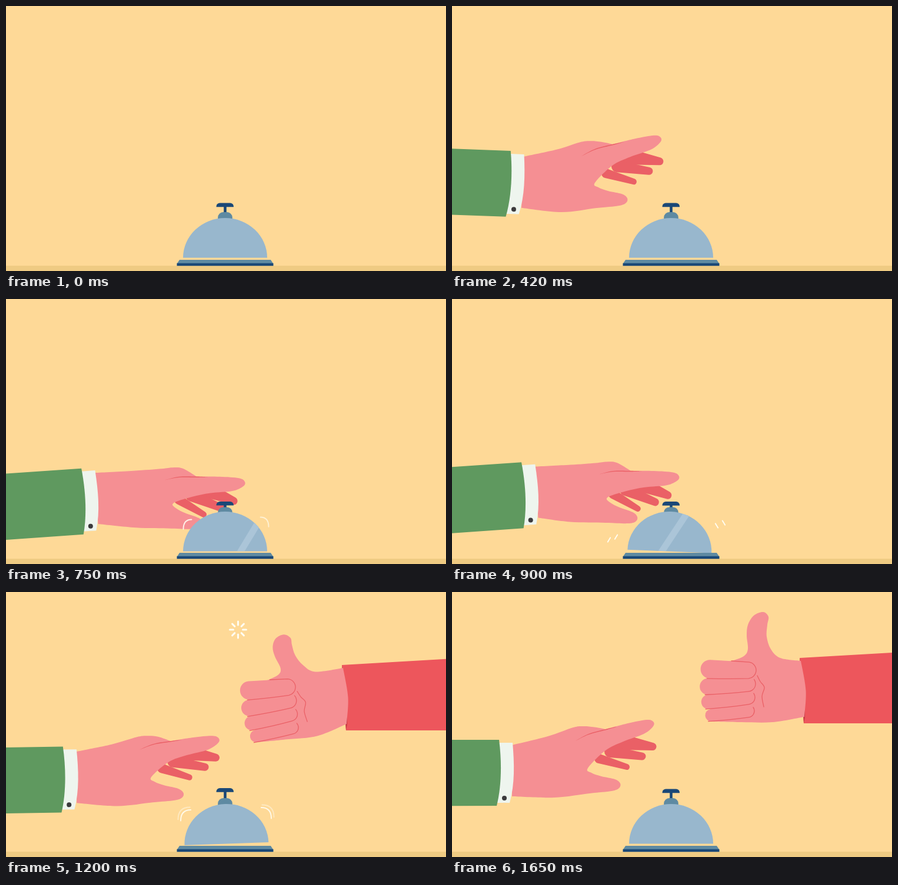
An HTML page with a canvas that plays this animation: 748 px wide and 450 px high, repeating every 2130 ms.

```html
<!DOCTYPE html>
<html lang="en">
<head>
<meta charset="utf-8">
<title>Service bell</title>
<style>
html, body { margin: 0; width: 100%; height: 100%; overflow: hidden; background: #fed997; }
canvas { display: block; }
</style>
</head>
<body>
<canvas id="stage" width="748" height="450"></canvas>
<script>
const ctx = document.getElementById('stage').getContext('2d');
const LOOP = 2130, STEP = 30, REST = 1650;
const C = {
  wall: '#fed997', floor: '#efcb83', skin: '#f58f93', shade: '#ea6066',
  green: '#5f995f', cuff: '#eef5ee', button: '#3b3a3c', red: '#ed565c', darkRed: '#c43a45',
  dome: '#98b7cd', shine: '#abc5d8', steel: '#5e8aa2', navy: '#1a4877', spark: '#fffdf2'
};

// ---- easing ----
const rad = degrees => degrees * Math.PI / 180;
const ramp = (t, from, to) => Math.min(1, Math.max(0, (t - from) / (to - from)));
const smooth = (t, from, to) => { const u = ramp(t, from, to); return u * u * (3 - 2 * u); };
const easeOut = (u, power) => 1 - (1 - u) ** power;
const backOut = (u, c) => 1 + (c + 1) * (u - 1) ** 3 + c * (u - 1) ** 2;

// ---- geometry and drawing helpers ----
function turn([x, y], degrees, px = 0, py = 0) {
  const c = Math.cos(rad(degrees)), s = Math.sin(rad(degrees));
  return [px + (x - px) * c - (y - py) * s, py + (x - px) * s + (y - py) * c];
}

function within(x, y, degrees, paint) {
  ctx.save();
  ctx.translate(x, y);
  ctx.rotate(rad(degrees));
  paint();
  ctx.restore();
}

// Point of one frame (x, y, degrees) from its local coordinates, and back.
const toWorld = (p, [x, y, degrees]) => { const q = turn(p, degrees); return [q[0] + x, q[1] + y]; };
const toLocal = (p, [x, y, degrees]) => turn([p[0] - x, p[1] - y], -degrees);

// Catmull-Rom curve; several chains meet in corners.
function spline(p, first) {
  if (first) ctx.moveTo(...p[0]); else ctx.lineTo(...p[0]);
  for (let i = 0; i < p.length - 1; i++) {
    const a = p[i - 1] || p[i], b = p[i], c = p[i + 1], d = p[i + 2] || c;
    ctx.bezierCurveTo(b[0] + (c[0] - a[0]) / 6, b[1] + (c[1] - a[1]) / 6,
      c[0] - (d[0] - b[0]) / 6, c[1] - (d[1] - b[1]) / 6, c[0], c[1]);
  }
}

function fillChains(color, ...chains) {
  ctx.beginPath();
  chains.forEach((chain, i) => spline(chain, i === 0));
  ctx.fillStyle = color;
  ctx.fill();
}

function poly(color, ...points) {
  ctx.beginPath();
  points.forEach(p => ctx.lineTo(...p));
  ctx.fillStyle = color;
  ctx.fill();
}

function box(color, x, y, w, h, radii = 0) {
  ctx.beginPath();
  ctx.roundRect(x, y, w, h, radii);
  ctx.fillStyle = color;
  ctx.fill();
}

// Finger: hull of a root circle and a tip circle.
function finger(color, x0, y0, r0, x1, y1, r1) {
  const dir = Math.atan2(y1 - y0, x1 - x0);
  const side = Math.acos((r0 - r1) / Math.hypot(x1 - x0, y1 - y0));
  ctx.beginPath();
  ctx.arc(x0, y0, r0, dir + side, dir - side);
  ctx.arc(x1, y1, r1, dir - side, dir + side);
  ctx.fillStyle = color;
  ctx.fill();
}

// ---- pressing hand, drawn around its knuckle ----
const indexShape = [[37, 5], [75, -5], [107, -11], [118, -8], [118, 0], [102, 13], [67, 26], [37, 41]];
const thumbShape = [[7, 71], [13, 79], [30, 85], [53, 90], [62, 97], [60, 105], [47, 110], [10, 114], [-50, 121]];
const crease = [[-16, 26], [8, 13], [37, 5], [55, 1]];

function pressingHand(t) {
  const lift = ramp(t, 900, REST), settle = easeOut(lift, 1.6);
  const press = smooth(t, 390, 690) * (1 - lift) ** 3;
  const sleeve = [
    130 - 392 * (1 - ramp(t, 60, 700)) ** 3.1 - 12 * smooth(t, 700, 900) - 38 * settle,
    246 + 44 * smooth(t, 440, 800) - 13 * smooth(t, 790, 910) - 26 * settle,
    2.4 * (1 - smooth(t, 390, 690)) - 3.9 * press
  ];
  const reach = 135 + 21 * smooth(t, 400, 630) - 12 * smooth(t, 700, 900);
  const knuckle = [...toWorld([reach, -23 + 32 * press], sleeve), 0];
  const drop = 15 * easeOut(press, 2), curl = press ** 1.5;
  const wrist = y => toLocal(toWorld([22, y], sleeve), knuckle);
  const lower = p => turn(p, drop, 0, 28);

  within(...knuckle, () => {
    within(0, 0, 0, () => {
      ctx.translate(20, -5);
      ctx.rotate(rad(14 * curl));
      ctx.translate(-20, 5);
      finger(C.shade, 60, 26, 14, 117, 34.5, 6.5);
      finger(C.shade, 45, 43, 10, 99, 51, 6.5);
      finger(C.shade, 26, 55, 8, 73, 69, 5);
    });
    const top = wrist(9);
    fillChains(C.skin,
      [top, [top[0] / 2, top[1] / 2 + 1], [-18, 2], [0, 0], [18, 1.5], lower(indexShape[0])],
      [...indexShape.map(lower), ...thumbShape.map(p => turn(p, 8 * curl, 80, 30)), wrist(96)]);
    const line = crease.map(lower);
    fillChains(C.shade, line, line.map(([x, y], i) => [x, y + 1.6 * Math.sin(i)]).reverse());
  });

  within(...sleeve, () => {
    ctx.fillStyle = C.cuff;
    ctx.beginPath();
    ctx.moveTo(-4, 5);
    ctx.lineTo(23, 5);
    ctx.bezierCurveTo(26, 40, 27, 75, 18, 107);
    ctx.lineTo(-6, 107);
    ctx.fill();
    box(C.button, 5, 95, 8, 8, 4);
    ctx.fillStyle = C.green;
    ctx.beginPath();
    ctx.moveTo(0, 0);
    ctx.bezierCurveTo(5, 40, 4, 80, -4, 112);
    ctx.lineTo(-500, 113);
    ctx.lineTo(-500, 0);
    ctx.fill();
  });
}

// ---- thumbs-up hand, drawn around the tip of its first folded finger ----
const raisedThumb = [[41, -21], [25, -36], [18, -57], [19, -77], [21, -91], [12, -99],
  [-4, -93], [-14, -77], [-16, -59], [-14, -36], [-21, -24], [-41, -16]];
const palmLine = [[2, 9], [7, 19], [14, 29], [10, 44], [13, 62]];

// Folding shears the thumb over the fist and squashes it.
function foldThumb([x, y], fold) {
  const h = -16 - y;
  return [x - 20 * fold * fold - 0.55 * h * fold, y + 0.72 * h * fold * fold];
}

function thumbsUp(t) {
  if (t <= 900) return;
  const swing = (1 - ramp(t, 900, 1200)) ** 2;
  const recover = backOut(ramp(t, 1200, REST), 2.5);
  const move = (low, entry, rest) => low + entry * swing + rest * recover;
  const sleeve = [move(571, 247, 20), move(124, -86, -12), 35 * swing];
  const fist = [move(492, 322, 25), move(160, -194, -27), move(-6.7, 91, 6.7)];
  const fold = Math.min(1, move(0.4, 1.67, -0.4));

  within(...sleeve, () => {
    poly(C.red, [0, 0], [400, -23], [400, 111], [7, 111]);
    poly(C.darkRed, [0, 0], [9, 50], [9, 101], [7, 111]);
  });

  const [top, edge, bottom] = [[2, 5], [10.5, 55], [8, 100]].map(p => toLocal(toWorld(p, sleeve), fist));
  within(...fist, () => {
    fillChains(C.skin,
      [top, ...raisedThumb.map(p => foldThumb(p, fold))],
      [[-78, -10], [-76, 87]],
      [[-76, 87], [-25, 88], [28, 88], bottom],
      [bottom, edge, top]);

    const fingers = [0, 1, 2, 3].map(i => [
      -82 + 2 * (i - 1.3) ** 2, -2 + 31.2 * i - 1.7 * i * i, 15.8 - 1.8 * i,
      -14, 23 * i, 14 - i
    ]);
    fingers.forEach(f => finger(C.skin, ...f));

    ctx.strokeStyle = C.shade;
    ctx.lineWidth = 1.3;
    fingers.forEach(([x0, y0, r0, x1, y1, r1], i) => {
      ctx.beginPath();
      if (i === 0) ctx.moveTo(-42, -16);
      ctx.arc(x1, y1, r1, rad(i === 0 ? -80 : -35), rad(85));
      ctx.quadraticCurveTo(-45, (y0 + r0 + y1 + r1) / 2 + 1, x0 - 5, y0 + r0);
      ctx.stroke();
    });
    ctx.beginPath();
    spline(palmLine, true);
    ctx.stroke();
  });
}

// ---- bell ----
function bell(t) {
  const rock = t < 770 ? 0 : 2.3 * Math.sin((t - 770) / 520 * 2 * Math.PI) * (1 - smooth(t, 1200, 1560));
  const push = 12 * smooth(t, 680, 780) - 13.5 * smooth(t, 830, 1090) + 1.5 * smooth(t, 1200, 1400);
  const sink = Math.max(0, push);

  box(C.navy, 370.2, 340 + push, 4.6, 14 - sink * 0.6);
  box(C.navy, 357.5, 334.5 + push, 29.5, 6.7, [6, 6, 0.5, 0.5]);
  box(C.steel, 360.2, 350 + sink * 0.36, 24.6, 15, [9, 9, 0, 0]);

  within(372.5, 360 + Math.min(1.1, sink), rock, () => {
    ctx.beginPath();
    ctx.ellipse(0, 67.5, 71.5, 67.5, 0, Math.PI, 2 * Math.PI);
    ctx.fillStyle = C.dome;
    ctx.fill();
    ctx.clip();
    const x = 51.5 - 0.262 * (t - 630);
    poly(C.shine, [x, 67.5], [x + 13, 67.5], [x + 55, -2], [x + 42, -2]);
  });

  poly(C.steel, [295, 431], [450, 431], [454, 437], [291, 437]);
  box(C.navy, 290.5, 436.7, 164, 4.6);
}

// ---- ringing strokes: an arc, then a double arc, then short ticks ----
function ringArc(side, spread, alpha) {
  const x = r => 374 + side * r, y = 371 - spread - 2 * side;
  ctx.globalAlpha = alpha;
  ctx.beginPath();
  ctx.moveTo(x(74 + spread), y + 17 + spread / 2);
  ctx.quadraticCurveTo(x(74 + spread), y, x(59 + spread * 0.3), y);
  ctx.stroke();
}

function ringWave(age) {
  if (age < 0 || age > 210) return;
  ctx.strokeStyle = C.spark;
  ctx.lineWidth = 1.9;
  for (const side of [-1, 1]) {
    if (age < 150) {
      const spread = (age - 60) / 20;
      ringArc(side, spread, side > 0 && age < 90 ? 0.65 : 0.9);
      if (age >= 90) ringArc(side, spread + 4.5, 0.45);
    } else {
      ctx.globalAlpha = 1;
      for (const j of [-1, 1]) {
        const x = 364.5 + side * (91.5 + 6 * j + (age - 180) / 12);
        const y = 394.5 - side * (12 + 2.4 * j);
        ctx.beginPath();
        ctx.moveTo(x - 2.2, y - 3.7 * side);
        ctx.lineTo(x + 2.2, y + 3.7 * side);
        ctx.stroke();
      }
    }
  }
  ctx.globalAlpha = 1;
}

function sparkle(t) {
  const p = ramp(t, 1110, 1290);
  if (p === 0 || p === 1) return;
  ctx.strokeStyle = C.spark;
  ctx.lineWidth = 3;
  for (let i = 0; i < 8; i++) {
    within(394.5, 64, i * 45, () => {
      ctx.beginPath();
      ctx.moveTo(16 * p, 0);
      ctx.lineTo(16 * easeOut(p, 3), 0);
      ctx.stroke();
    });
  }
}

function draw(t) {
  box(C.wall, 0, 0, 748, 450);
  box(C.floor, 0, 441, 748, 9);
  if (t >= 90) pressingHand(t);
  bell(t);
  [720, 960, 1080].forEach(start => ringWave(t - start));
  thumbsUp(t);
  sparkle(t);
}

const begin = performance.now();
function tick() {
  const t = (performance.now() - begin) % LOOP;
  draw(Math.min(REST, Math.floor(t / STEP) * STEP));
  requestAnimationFrame(tick);
}
ctx.lineCap = ctx.lineJoin = 'round';
tick();
</script>
</body>
</html>
```
